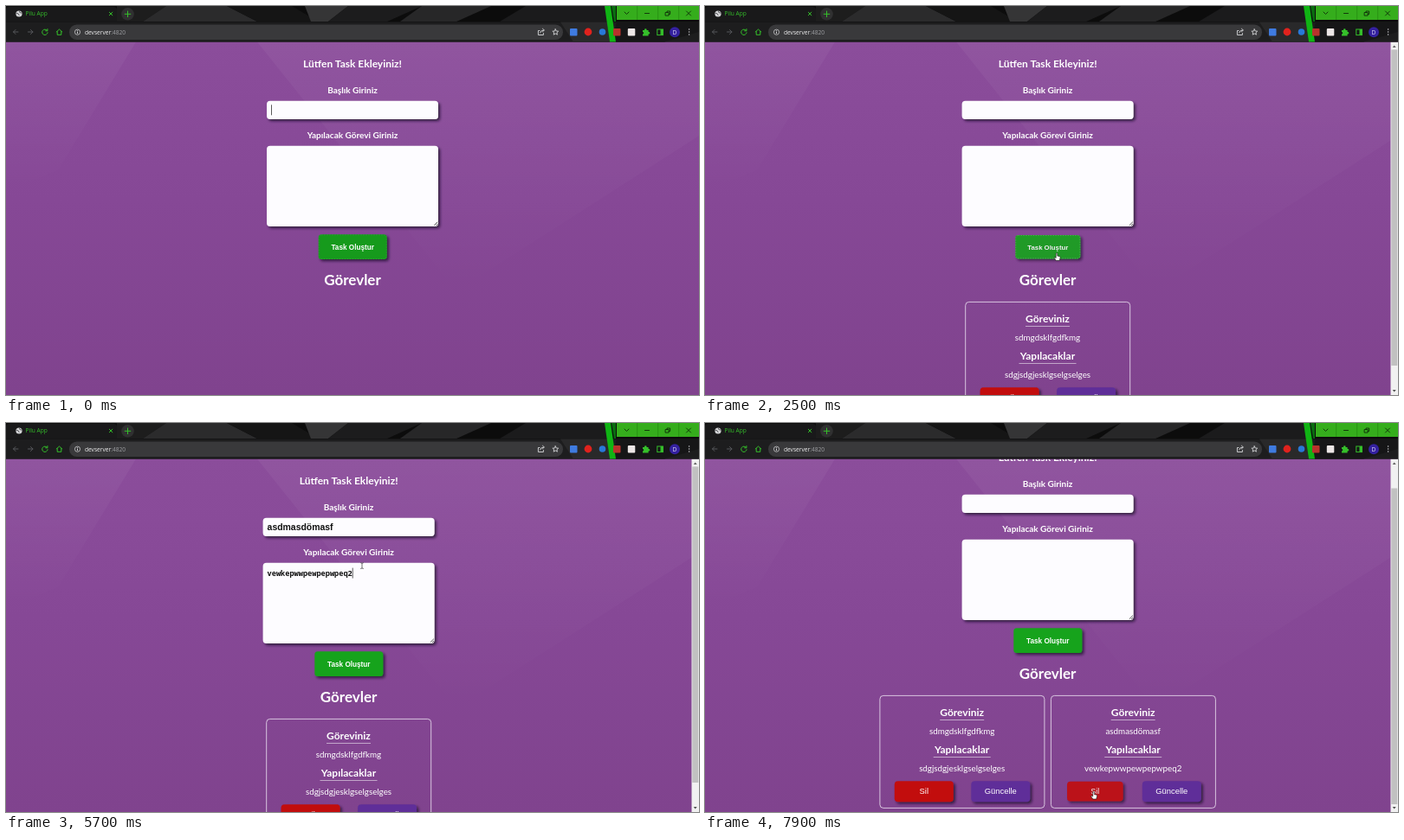
Recreate the animation shown at these times as an HTML page. Size 800 by 450 pixels, loop 8000 ms.

```html
<!DOCTYPE html>
<html lang="tr">
<head>
<meta charset="utf-8">
<title>Task form</title>
<style>
  html, body { margin: 0; width: 100%; height: 100%; overflow: hidden; background: #844694; }
  svg { display: block; width: 800px; height: 450px; }
  text { white-space: pre; }
  .ui { font: 6.6px "Open Sans", "Noto Sans", sans-serif; }
  .b, .r { font-family: Lato, "Open Sans", sans-serif; fill: #fff; text-anchor: middle; }
  .b { font-weight: 700; }
  .r { font-size: 9.8px; }
  .btn { font: 9.4px "Liberation Sans", Arial, sans-serif; fill: #fff; text-anchor: middle; }
  .sub { font: 700 8.2px "Liberation Sans", Arial, sans-serif; fill: #fff; text-anchor: middle; }
  .in { font: 700 10.45px "Liberation Sans", Arial, sans-serif; fill: #111; }
  .mono { font: 700 8.62px "Noto Sans Mono", "DejaVu Sans Mono", monospace; fill: #111; }
  .line { fill: none; stroke-width: 1; stroke-linecap: round; stroke-linejoin: round; }
</style>
</head>
<body>
<svg id="stage" viewBox="0 0 800 450" xmlns="http://www.w3.org/2000/svg"></svg>
<script>
const LOOP = 8000, STEP = 100;
const TASKS = [
  { title: 'sdmgdsklfgdfkmg', body: 'sdgjsdgjesklgselgselges' },
  { title: 'asdmasdömasf', body: 'vewkepwwpewpepwpeq2' }
];
const stage = document.getElementById('stage');
const $ = id => document.getElementById(id);

const rect = (x, y, w, h, fill, more = '') =>
  `<rect x="${x}" y="${y}" width="${w}" height="${h}" fill="${fill}" ${more}/>`;
const poly = (points, fill, more = '') => `<polygon points="${points}" fill="${fill}" ${more}/>`;
const circle = (x, y, r, fill, more = '') => `<circle cx="${x}" cy="${y}" r="${r}" fill="${fill}" ${more}/>`;
const line = (d, color, more = '') => `<path class="line" d="${d}" stroke="${color}" ${more}/>`;
const text = (cls, x, y, s, more = '') => `<text class="${cls}" x="${x}" y="${y}" ${more}>${s}</text>`;
const heading = (x, y, size, s) => text('b', x, y, s, `font-size="${size}"`);

const defs = `<defs>
  <linearGradient id="bg" x2="0" y2="1">
    <stop offset="0" stop-color="#8b4d9b"/><stop offset=".45" stop-color="#864896"/>
    <stop offset="1" stop-color="#80438e"/>
  </linearGradient>
  <linearGradient id="fade" x2="0" y2="1">
    <stop offset="0" stop-color="#fff" stop-opacity=".045"/><stop offset="1" stop-color="#fff" stop-opacity="0"/>
  </linearGradient>
  <filter id="shade" x="-10%" y="-20%" width="125%" height="155%">
    <feDropShadow dx="2.2" dy="2.2" stdDeviation="1.5" flood-color="#1d0b28" flood-opacity=".75"/>
  </filter>
  <clipPath id="view"><rect y="41.5" width="800" height="408.5"/></clipPath>
</defs>`;

function browser() {
  const green = '#35c02a', pale = '#c9cacc';
  return rect(0, 0, 800, 41.5, '#0c0c0c')
    + poly('128,0 185,0 158,18 128,18', '#1d1d1d')
    + poly('185,0 255,0 290,18 158,18', '#2b2b2c')
    + poly('255,0 330,0 360,18 290,18', '#151515')
    + poly('345,0 395,0 372,18 352,18', '#353536')
    + poly('395,0 480,0 440,18 372,18', '#1c1c1d')
    + poly('480,0 560,0 520,18 455,18', '#272728')
    + poly('600,0 692,0 695,18 570,18', '#1b1b1c')
    + rect(0, 18.5, 800, 23, '#1d1d1e')
    + poly('640,18.5 694,18.5 697,41.5 655,41.5', '#29292a')
    + poly('705,18.5 800,18.5 800,30 760,41.5 700,41.5', '#161617')
    + `<path d="M0 18.5V4q0-3 4-3H124q4 0 4 3V18.5z" fill="#19191a"/>`
    + poly('691,0 698,0 704,41.5 697,41.5', '#10b414')
    + poly('699,0 704,0 704,18 702,18', '#0a6b10')
    + rect(705, 0, 95, 16, '#35ad1c')
    + [728.5, 752.5, 776.5].map(x => rect(x, 0, .6, 16, '#23800f')).join('')
    + line('M714 7l2.5 2.5L719 7M737.5 8.5h5M785.5 6l5 5m0-5l-5 5', '#12380b')
    + line('M761.5 7.5h3.6v3.6h-3.6zM763 7.5V6h3.6v3.6h-1.5', '#12380b', 'stroke-width=".8"')
    + circle(15, 9, 3.6, '#d5d6d8')
    + line('M12 8.2l2 .6 1 1.6M15.5 5.8l.4 1.7 2 .6', '#55565a')
    + text('ui', 22.5, 11.4, 'Pilu App', `fill="${green}"`)
    + line('M119.3 7.2l3.6 3.6m0-3.6l-3.6 3.6', green)
    + circle(140.5, 9.3, 7.3, '#303031')
    + line('M140.5 6v6.6M137.2 9.3h6.6', green)
    + line('M14 30H8.5m2.5-2.5L8.5 30l2.5 2.5M25.5 30H31m-2.5-2.5L31 30l-2.5 2.5', '#55565a')
    + line('M47.4 28.2a3.2 3.2 0 1 0 .7 2.6M47.9 26.6v2.2h-2.2', green)
    + line('M58.2 30l3.3-3 3.3 3M59.2 29.6v3.7h4.6v-3.7', green)
    + rect(73, 21.5, 570, 17.5, '#39393b', 'rx="8.7"')
    + circle(82.5, 30.2, 3.1, 'none', `stroke="${pale}" stroke-width=".8"`)
    + line('M82.5 30v1.7M82.5 28.6v.1', pale, 'stroke-width=".8"')
    + text('ui', 91, 32.7, 'devserver<tspan fill="#9fa0a4">:4820</tspan>', 'fill="#f1f1f2"')
    + line('M616 28.5h-1.6v5h6v-2M616.5 31q.5-3 4.5-3M619.5 26.3l1.8 1.7-1.8 1.7', pale, 'stroke-width=".8"')
    + line('M634.3 26.8l1 2.2 2.4.2-1.8 1.6.5 2.4-2.1-1.3-2.1 1.3.5-2.4-1.8-1.6 2.4-.2z', pale, 'stroke-width=".8"')
    + rect(651, 26, 8.5, 8.5, '#3f7be0', 'rx="1"')
    + circle(672, 30, 4.4, '#e0221d')
    + circle(688.5, 30, 3.8, '#2878d8')
    + rect(701, 26, 8.5, 8.5, '#b8322c', 'rx="1"')
    + rect(717.8, 26, 8.5, 8.5, '#ece6e6', 'rx="1"')
    + `<path d="M735 28h2v-.5a1.3 1.3 0 0 1 2.6 0v.5h2v2h.4a1.3 1.3 0 0 1 0 2.6h-.4v1.9h-6.6v-2a1.2 1.2 0 0 0 0-2.4z" fill="${green}"/>`
    + rect(751.8, 27, 6.6, 6.6, 'none', `stroke="${green}"`) + rect(755.5, 27, 3, 6.6, green)
    + circle(772, 30.2, 6, '#3421a0')
    + text('ui', 772, 32.6, 'D', 'fill="#e4e0f5" text-anchor="middle"')
    + [27, 30, 33].map(y => circle(788.6, y, .8, pale)).join('');
}

const form = `<g id="form">
  ${heading(400, 71, 12, 'Lütfen Task Ekleyiniz!')}
  ${heading(400, 101, 10, 'Başlık Giriniz')}
  ${rect(301, 109.8, 198, 21.2, '#fdfcff', 'rx="4" filter="url(#shade)"')}
  ${text('in', 306, 124, '', 'id="title"')}
  ${heading(400, 153, 10, 'Yapılacak Görevi Giriniz')}
  ${rect(301, 161.8, 198, 93.2, '#fdfcff', 'rx="4" filter="url(#shade)"')}
  ${line('M494.5 253.5l3.5-3.5M496.8 253.7l1.3-1.3', '#555', 'stroke-width=".7"')}
  ${text('mono', 306, 176.6, '', 'id="body"')}
  <path id="spell" class="line" stroke="#e23030" stroke-width=".8" stroke-dasharray="1.2 1"/>
  ${rect(0, 0, .8, 12, '#333', 'id="caret"')}
  <g id="send">
    ${rect(360.7, 264.3, 79, 28.8, '#149a1b', 'id="face" rx="3.5" filter="url(#shade)"')}
    ${rect(361.2, 264.8, 78, 27.8, 'none', 'id="dash" rx="3" stroke="#6fd070" stroke-width=".7" stroke-dasharray="1.5 1.5"')}
    ${text('sub', 400.2, 281.7, 'Task Oluştur')}
  </g>
  ${heading(400, 322.5, 17, 'Görevler')}
</g>`;

const underline = (y, w) => rect(95.2 - w / 2, y, w, .7, '#fff', 'opacity=".75"');
const cards = TASKS.map((task, i) => `<g id="card${i}">
  ${rect(.4, .4, 190, 130, 'none', 'rx="4" stroke="#e3d4e8" stroke-width=".9"')}
  ${heading(95.2, 23.7, 12, 'Göreviniz')}${underline(28.2, 51)}
  ${text('r', 95.2, 45, task.title)}
  ${heading(95.2, 67, 12, 'Yapılacaklar')}${underline(71.2, 66)}
  ${text('r', 95.2, 88, task.body)}
  <g id="del${i}">${rect(17.3, 99.2, 68, 24, '#c20a10', 'rx="4" filter="url(#shade)"')}${text('btn', 51.3, 114.4, 'Sil')}</g>
  ${rect(105.8, 99.2, 68, 24, '#5f2f99', 'rx="4" filter="url(#shade)"')}${text('btn', 139.8, 114.4, 'Güncelle')}
</g>`).join('');

const bar = `<g id="bar">
  ${rect(791.5, 41.5, 8.5, 408.5, '#f1f1f1')}
  ${poly('793.7,48 797.7,48 795.7,45.6', '#606060')}${poly('793.7,444 797.7,444 795.7,446.4', '#505050')}
  ${rect(792.3, 50.5, 7, 365.5, '#c1c1c1', 'id="thumb"')}
</g>`;

const pointers = `<g id="mouse">
  <path id="arrow" d="M0 0V7.6L1.8 6 3 8.6 4.1 8.1 3 5.6H5.3z" fill="#fff" stroke="#111" stroke-width=".5"/>
  <path id="hand" d="M-.8.7Q0-.5.8.7V3.6L3.5 4.2Q4.3 4.5 4.1 5.5L3.3 9H-.7L-3 5.7Q-2.4 4.6-.8 6z" fill="#fff" stroke="#111" stroke-width=".6"/>
  <path id="beam" class="line" d="M-1.4-3.3Q0-3.3 0-2.6Q0-3.3 1.4-3.3M0-2.6V2.8M-1.4 3.4Q0 3.4 0 2.8Q0 3.4 1.4 3.4" stroke="#333" style="stroke-width:.7"/>
</g>`;

stage.innerHTML = defs + rect(0, 41, 800, 409, 'url(#bg)')
  + poly('0,41.5 150,41.5 60,190 0,215', 'url(#fade)')
  + poly('290,41.5 800,41.5 800,150 520,330', 'url(#fade)')
  + `<g clip-path="url(#view)"><g id="page">${form}${cards}</g></g>` + bar + browser() + pointers;

// time, x, y, pointer shape
const PATH = [
  [1800, 404, 312, 'arrow'], [1900, 404, 312, 'arrow'], [2000, 401, 291, 'hand'],
  [2100, 400, 284, 'hand'], [2400, 400, 284, 'hand'], [2600, 412, 287, 'hand'],
  [2700, 412, 287, 'hand'], [3000, 437, 291, 'hand'], [3100, 433, 262, 'arrow'],
  [3200, 428, 225, 'beam'], [3500, 411, 126, 'beam'], [3700, 411, 126, 'beam'],
  [3800, 411, 130.4, 'beam'], [5300, 411, 130.4, 'beam'], [5700, 411, 165, 'beam'],
  [5900, 411, 165, 'beam'], [6100, 404, 272, 'hand'], [6200, 402, 280, 'hand'],
  [6400, 402, 280, 'hand'], [6500, 436, 288, 'arrow'], [6800, 495, 298, 'arrow'],
  [7300, 450, 424, 'arrow'], [7500, 450, 424, 'arrow'], [7700, 448.5, 426, 'hand'],
  [8000, 448.5, 426, 'hand']
];

const ramp = (t, a, b) => Math.min(1, Math.max(0, (t - a) / (b - a)));
const ease = p => p * p * (3 - 2 * p);
const typed = (s, t, a, b) => s.slice(0, Math.round(s.length * ramp(t, a, b)));
const set = (id, name, value) => $(id).setAttribute(name, value);
const show = (id, on) => set(id, 'display', on ? 'inline' : 'none');
const zoom = (x, y, s) => `translate(${x} ${y}) scale(${s}) translate(${-x} ${-y})`;

function drawMouse(t) {
  show('mouse', t >= PATH[0][0]);
  const i = PATH.findLastIndex(k => k[0] <= t);
  if (i < 0) return;
  const a = PATH[i], b = PATH[i + 1] || a;
  const p = ramp(t, a[0], b[0] + (a === b));
  set('mouse', 'transform', `translate(${a[1] + (b[1] - a[1]) * p} ${a[2] + (b[2] - a[2]) * p})`);
  for (const kind of ['arrow', 'hand', 'beam']) show(kind, kind === a[3]);
}

function drawFields(t) {
  const first = t < 2200, filled = first || t < 6300;
  const task = TASKS[first ? 0 : 1];
  $('title').textContent = !filled ? '' : first ? typed(task.title, t, 0, 400) : typed(task.title, t, 3700, 4200);
  $('body').textContent = !filled ? '' : first ? typed(task.body, t, 700, 1500) : typed(task.body, t, 4460, 5200);
  const end = 306 + $('body').getComputedTextLength();
  set('spell', 'd', `M306 178.4H${end}`);
  show('spell', first && end > 306);

  const inTitle = t < 600 || (t >= 3500 && t < 4500);
  const inBody = (t >= 600 && first) || (t >= 4500 && filled);
  show('caret', inTitle || inBody);
  set('caret', 'x', inTitle ? 306.2 + $('title').getComputedTextLength() : end);
  set('caret', 'y', inTitle ? 114.3 : 167.6);
}

function draw(t) {
  const count = (t >= 2200) + (t >= 6300);
  const scroll = 27 * ease(ramp(t, 7400, 7700));
  const focus = ramp(t, 2100, 2400) - ramp(t, 3400, 3700) + ramp(t, 6200, 6500) - ramp(t, 7600, 7900);
  const press = ramp(t, 7700, 7900);

  drawFields(t);
  drawMouse(t);
  set('page', 'transform', `translate(0 ${-scroll})`);
  set('form', 'transform', `translate(${count ? -4.4 : 0} 0)`);
  set('send', 'transform', zoom(400.2, 278.7, 1 - .05 * focus));
  set('send', 'opacity', 1 - .1 * focus);
  set('face', 'fill', count ? '#18a31f' : '#149a1b');
  set('dash', 'opacity', count ? .7 * focus : .3);

  show('card0', count > 0);
  show('card1', count > 1);
  set('card0', 'transform', `translate(${count > 1 ? 201.5 : 300.3} 342)`);
  set('card1', 'transform', 'translate(399 342)');
  set('del1', 'transform', zoom(51.3, 111.2, 1 - .05 * press));
  set('del1', 'opacity', 1 - .1 * press);

  show('bar', count > 0);
  set('thumb', 'y', 50.5 + scroll * 25 / 27);
}

const start = performance.now();
function tick(now) {
  const t = Math.max(0, now - start) % LOOP;
  draw(Math.floor(t / STEP) * STEP);
  requestAnimationFrame(tick);
}
draw(0);
requestAnimationFrame(tick);
</script>
</body>
</html>
```
